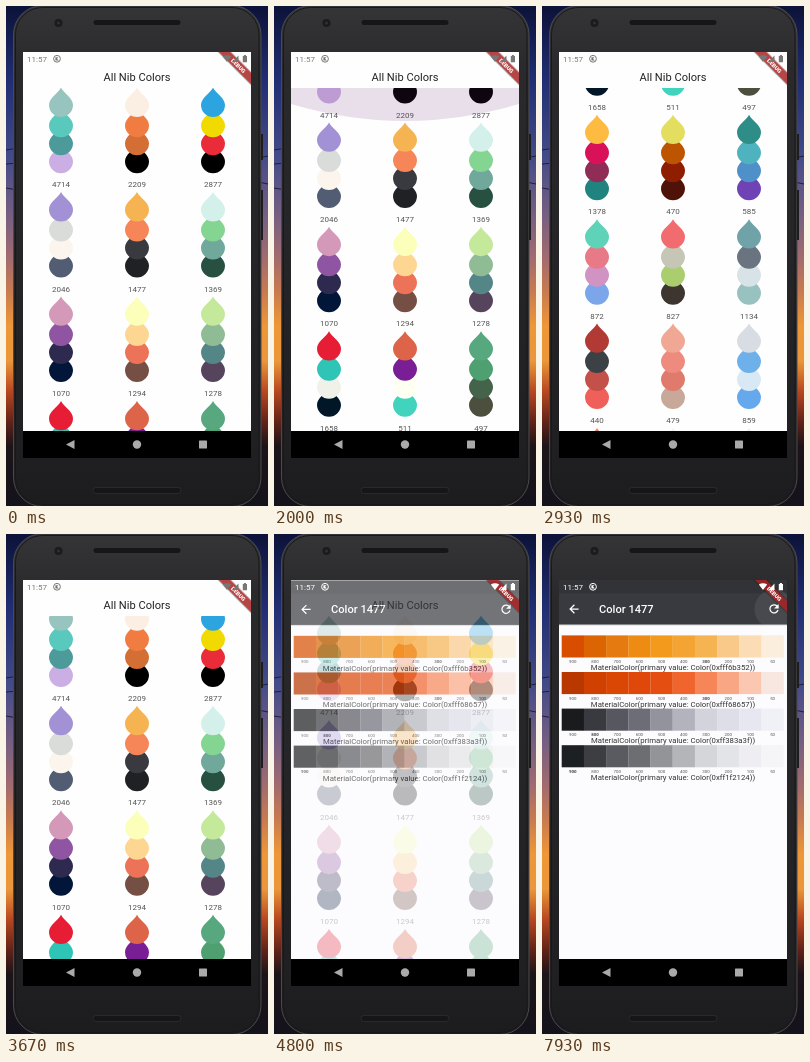
Animation, 262 px wide and 500 px high, one loop 8 s. Source, as an HTML page:

```html
<!DOCTYPE html>
<html lang="en">
<head>
<meta charset="utf-8">
<title>Color palettes</title>
<style>
  html, body { margin: 0; width: 100%; height: 100%; overflow: hidden; background: #222; }
  svg { display: block; width: 100%; height: 100%; font-family: Roboto, sans-serif; }
  .mid { text-anchor: middle; }
  .count { font-size: 8px; fill: #555; }
  .shade { font-size: 4.4px; fill: #555; }
  .value { font-size: 7.77px; fill: #333; }
</style>
</head>
<body>
<svg viewBox="0 0 262 500">
  <defs>
    <linearGradient id="sky" x2="0" y2="1">
      <stop offset="0" stop-color="#0c1238"/>
      <stop offset=".15" stop-color="#212e74"/>
      <stop offset=".3" stop-color="#434b88"/>
      <stop offset=".42" stop-color="#775f82"/>
      <stop offset=".5" stop-color="#a06a70"/>
      <stop offset=".57" stop-color="#c87a50"/>
      <stop offset=".64" stop-color="#ee9638"/>
      <stop offset=".71" stop-color="#eb963a"/>
      <stop offset=".77" stop-color="#b84820"/>
      <stop offset=".83" stop-color="#642318"/>
      <stop offset=".88" stop-color="#1c1418"/>
      <stop offset="1" stop-color="#14121c"/>
    </linearGradient>
    <linearGradient id="shell" x2="0" y2="1">
      <stop offset="0" stop-color="#353538"/>
      <stop offset=".12" stop-color="#2a2a2c"/>
      <stop offset=".88" stop-color="#201f22"/>
      <stop offset="1" stop-color="#1c1b1e"/>
    </linearGradient>
    <clipPath id="screen"><rect x="17" y="46" width="228" height="379"/></clipPath>
    <clipPath id="listArea"><rect x="17" y="82" width="228" height="343"/></clipPath>
    <clipPath id="barArea"><rect x="17" y="46" width="228" height="44.5"/></clipPath>
    <path id="drop" d="M0-17.3C3-11.4 12-7.200 12 0A12 12 0 0 1-12 0C-12-7.200-3-11.400 0-17.300Z"/>
  </defs>

  <rect width="262" height="500" fill="url(#sky)"/>
  <path d="M0 144L12 142M0 158L12 157M0 182L12 184M252 152L262 150M252 176L262 178" stroke="#1c1f3c"/>

  <rect x="7.500" y="-.500" width="247.500" height="501" rx="29" fill="url(#shell)" stroke="#4a4a4d"/>
  <rect x="9.500" y="1.500" width="243.500" height="497" rx="27" fill="none" stroke="#19191b"/>
  <rect x="255" y="128" width="2" height="26" fill="#1d1d1f"/>
  <rect x="255" y="184" width="2" height="50" fill="#1d1d1f"/>
  <rect x="87" y="13.500" width="88" height="6" rx="3" fill="#161618" stroke="#3e3e40" stroke-width=".6"/>
  <rect x="87" y="481.500" width="88" height="6" rx="3" fill="#161618" stroke="#343436" stroke-width=".6"/>
  <circle cx="52.500" cy="17" r="4" fill="#1b1b1d"/>
  <circle cx="52.500" cy="17" r="1.600" fill="#29303e"/>
  <rect x="17" y="425" width="228" height="27" fill="#000"/>
  <g fill="#aaa">
    <path d="M60 438.500L68.500 434V443Z"/>
    <circle cx="131" cy="438.500" r="4.200"/>
    <rect x="193" y="434.500" width="8" height="8" rx=".6"/>
  </g>

  <g clip-path="url(#screen)">
    <rect x="17" y="46" width="229" height="380" fill="#fefefe"/>
    <text class="mid" x="131" y="75" font-size="11.100" fill="#222">All Nib Colors</text>
    <g clip-path="url(#listArea)">
      <g id="list"></g>
      <g transform="translate(0 82)"><path id="glow" d="M17 0H245V16Q131 50 17 16Z" fill="#6a2470" fill-opacity=".14"/></g>
    </g>

    <g id="detail">
      <rect x="17" y="46" width="229" height="380" fill="#fcfbfd"/>
      <rect x="17" y="89" width="229" height="2.500" fill="#000" opacity=".16"/>
      <rect id="bar" x="17" y="46" width="229" height="44.500"/>
      <rect x="17" y="46" width="229" height="13.300" fill="#000" opacity=".12"/>
      <g clip-path="url(#barArea)"><circle id="ripple" cx="232" cy="75" fill="#fff"/></g>
      <g fill="none" stroke="#fff" stroke-width="1.250">
        <path d="M36.600 75H28.400M32.400 70.700L28.100 75L32.400 79.300"/>
        <path d="M235 72A4.100 4.100 0 1 0 236 76"/>
      </g>
      <path d="M236.700 69.800V74.400H232.100Z" fill="#fff"/>
      <text x="57" y="78.900" font-size="11.100" font-weight="500" fill="#fff">Color 1477</text>
      <g id="ramps"></g>
    </g>

    <g transform="translate(232.300 59.800) rotate(45)">
      <rect x="-30" y="-5" width="60" height="10" fill="#000" opacity=".25"/>
      <rect x="-30" y="-4" width="60" height="8" fill="#b42424" opacity=".78"/>
      <text class="mid" y="2" font-size="5.600" font-weight="900" fill="#fff">DEBUG</text>
    </g>
    <g id="status">
      <text x="21" y="55.900" font-size="8">11:57</text>
      <circle cx="51" cy="52.800" r="3.400" fill="none" stroke="currentColor"/>
      <path d="M49.400 54.400V51.200H52.400L51 52.800L53 54.400Z"/>
      <path d="M216.800 50.500Q221 47.800 225.200 50.500L221 56Z"/>
      <path d="M226.500 56H232.500V49.500Z"/>
      <path d="M236.800 50H237.900V49H239.900V50H241V56.200H236.800Z"/>
    </g>
  </g>
</svg>
<script>
const LOOP = 8000, COLUMNS = [55, 131, 207], ROW_STEP = 104.4;
const byId = id => document.getElementById(id);

const palettes = `4714 97c4bf 59c9bd 4d9a9b cbaee3
2209 fbeee2 f07c42 d36e35 000000
2877 2ba4df f0da00 ea2b39 000000
2046 a391d6 d9dcd8 fbf5ed 525c72
1477 f6b352 f68657 383a3f 1f2124
1369 d3f0ea 84d492 70a89b 275040
1070 d499b9 9055a2 2e294e 011638
1294 fbffb9 fdd692 ec7357 754f44
1278 c5e99b 8fbc94 548687 56445d
1658 e71d36 2ec4b6 f0f1e8 011627
511 de6449 791e94 fffff2 41d3bd
497 57a87f 4fa070 43644a 4c4f3e
1378 fdbb42 d81159 8f2d56 218380
470 e3de60 bd5500 8f1d00 4e1208
585 2e8d87 4fb3bf 5090c8 6f43b5
872 5fd3b8 e87a88 d093c2 7ba7ea
827 f16b6f c5c6b6 aacd6e 3c3530
1134 6fa3a8 6a7380 d8e3e7 97c2c0
440 b13a35 3c4146 c4504a f0605a
479 f0a894 ef8a7e e07a6c c8a898
859 d7dde3 6eb0ea d8e8f5 66a8ec
1120 e8806e
733 f4f1ee
956 eef1f4`.split("\n").map(line => line.split(" "));

// Later dots are painted first, so the drop lies on top of the stack.
byId("list").innerHTML = palettes.map(([count, ...colors], i) => {
  const offsets = [99, 119.2, 137.2, 155.2];
  const dots = colors.map((color, k) =>
    `<use href="#drop" y="${offsets[k]}" fill="#${color}"/>`).reverse().join("");
  return `<g transform="translate(${COLUMNS[i % 3]} ${Math.floor(i / 3) * ROW_STEP})">
    ${dots}<text class="mid count" y="181.300">${count}</text></g>`;
}).join("");

const ramps = [
  ["f6b352", 6, "d94d00 dc6403 e47a10 ee8b12 f39a1c f4a432 f6b352 f9c98a fbdcb4 fbeedc"],
  ["f68657", 6, "b83800 d04000 da4604 e0480a e44e10 f0642e f68657 f9a684 fbc7b0 f8e6e0"],
  ["383a3f", 1, "191b1d 383a3f 57575f 6c6d77 92939d b3b3bd d3d3dc dddee8 e6e7f0 f0f1f7"],
  ["1f2124", 0, "1c2022 3c3e42 595b60 6d6e72 939498 b4b5b9 d5d6da e3e4e8 eeeef2 f5f5f8"],
];

byId("ramps").innerHTML = ramps.map(([primary, main, shades], row) => {
  const width = 22.2, cells = shades.split(" ").map((color, i) => {
    const x = 19.7 + i * width;
    return `<rect x="${x}" y="101.400" width="${width + .1}" height="22.100" fill="#${color}"/>
      <text class="mid shade" x="${x + width / 2}" y="129" font-weight="${i === main ? 900 : 400}">${i < 9 ? 900 - i * 100 : 50}</text>`;
  }).join("");
  return `<g transform="translate(0 ${row * 36.6})">${cells}
    <text class="mid value" x="131" y="136.300">MaterialColor(primary value: Color(0xff${primary}))</text></g>`;
}).join("");

const clamp = p => Math.min(1, Math.max(0, p));
const progress = (t, start, length) => clamp((t - start) / length);

function track(t, keys) {
  const i = keys.findIndex(key => key[0] > t);
  if (i < 0) return keys[keys.length - 1][1];
  if (i === 0) return keys[0][1];
  const [t0, v0] = keys[i - 1], [t1, v1] = keys[i];
  return v0 + (v1 - v0) * (t - t0) / (t1 - t0);
}

const scrollKeys = [[1830, 0], [1900, 14], [2000, 69], [2130, 155], [2270, 227], [2400, 283],
  [2530, 325], [2670, 357], [2800, 378], [2930, 390.5], [3070, 398], [3200, 401],
  [3330, 401], [3400, 342], [3470, 235], [3530, 143], [3600, 64], [3670, 14.5], [3730, 0]];
const glowKeys = [[1530, 0], [1800, 1], [2000, 1], [2330, 0], [3730, 0], [3850, .6], [4250, 0]];
const taps = [6070, 7070, 7930];

function draw(t) {
  byId("list").setAttribute("transform", `translate(0 ${-track(t, scrollKeys)})`);
  const glow = track(t, glowKeys);
  byId("glow").setAttribute("transform", `scale(1 ${glow})`);
  byId("glow").setAttribute("opacity", glow);

  const open = progress(t, 4550, 300);
  byId("detail").setAttribute("transform", `translate(0 ${95 * (1 - open) ** 3})`);
  byId("detail").setAttribute("opacity", open ** 2);
  byId("status").style.cssText = open > .5 ? "fill:#fff;color:#fff" : "fill:#777;color:#777";

  const dark = progress(t, 6130, 200) - progress(t, 7130, 200);
  const mix = (a, b) => Math.round(a + (b - a) * dark);
  byId("bar").setAttribute("fill", `rgb(${mix(56, 31)},${mix(58, 33)},${mix(63, 36)})`);

  const tap = taps.filter(start => start <= t).pop();
  const age = tap === undefined ? 1 : progress(t, tap, 330);
  byId("ripple").setAttribute("r", 19.5 + 2 * age);
  byId("ripple").setAttribute("opacity", .08 * (1 - age ** 2));
}

const start = performance.now();
function tick() {
  draw((performance.now() - start) % LOOP);
  requestAnimationFrame(tick);
}
tick();
</script>
</body>
</html>
```
